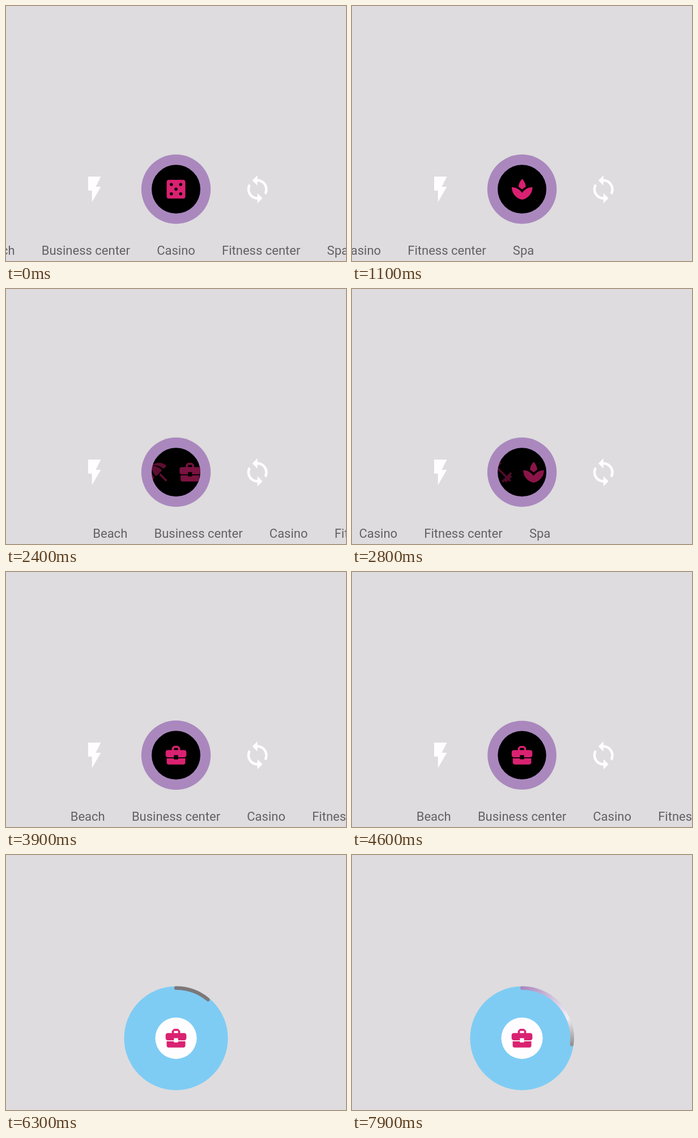
Animation of 600 by 450 pixels, one loop 8000 ms. Source, as an HTML page with a canvas:

```html
<!DOCTYPE html>
<html lang="en">
<head>
<meta charset="utf-8">
<title>Amenity picker button</title>
<style>
  html, body { margin: 0; width: 100%; height: 100%; overflow: hidden; background: #dedcde; }
  canvas { display: block; }
</style>
</head>
<body>
<canvas id="stage" width="600" height="450"></canvas>
<script>
const ctx = document.getElementById('stage').getContext('2d');
const LOOP = 8000, STEP = 100;
const CX = 300, CY = 323.3;
const FONT = '22px Roboto, "Open Sans", sans-serif';
const LABEL_GAP = 47.2, ICON_GAP = 56.5, ICON_LAG = 28;

const PURPLE = [170, 136, 190], BLUE = [126, 204, 244];
const BLACK = [0, 0, 0], WHITE = [255, 253, 255];
const GRAY = [124, 120, 122], PALE_GRAY = [150, 144, 147], LILAC = [243, 238, 243];

const dot = (x, y) => `M${x - 1.5} ${y}a1.5 1.5 0 1 0 3 0a1.5 1.5 0 1 0 -3 0z`;
const dice = 'M19 3H5c-1.1 0-2 .9-2 2v14c0 1.1.9 2 2 2h14c1.1 0 2-.9 2-2V5c0-1.1-.9-2-2-2z' +
  dot(7.5, 7.5) + dot(16.5, 7.5) + dot(12, 12) + dot(7.5, 16.5) + dot(16.5, 16.5);

const pages = [
  ['Beach', 'M13.13 14.56l1.43-1.43 6.44 6.44L19.57 21zM17.42 8.83l2.86-2.86c-3.95-3.95-10.35-3.96-14.3-.02 3.93-1.3 8.31-.25 11.44 2.88zM5.95 5.98c-3.94 3.95-3.93 10.35.02 14.3l2.86-2.86C5.7 14.29 4.65 9.91 5.95 5.98zM5.97 5.96l-.01.01c-.38 3.01 1.17 6.88 4.3 10.02l5.73-5.73c-3.13-3.13-7.01-4.68-10.02-4.3z'],
  ['Business center', 'M10 16v-1H3.01L3 19c0 1.11.89 2 2 2h14c1.11 0 2-.89 2-2v-4h-7v1h-4zm10-9h-4.01V5l-2-2h-4l-2 2v2H4c-1.1 0-2 .9-2 2v3c0 1.11.89 2 2 2h6v-2h4v2h6c1.1 0 2-.9 2-2V9c0-1.1-.9-2-2-2zm-6 0h-4V5h4v2z'],
  ['Casino', dice],
  ['Fitness center', 'M20.57 14.86L22 13.43 20.57 12 17 15.57 8.43 7 12 3.43 10.57 2 9.14 3.43 7.71 2 5.57 4.14 4.14 2.71 2.71 4.14l1.43 1.43L2 7.71l1.43 1.43L2 10.57 3.43 12 7 8.43 15.57 17 12 20.57 13.43 22l1.43-1.43L16.29 22l2.14-2.14 1.43 1.43 1.43-1.43-1.43-1.43L22 16.29z'],
  ['Spa', 'M15.49 9.63c-.18-2.79-1.31-5.51-3.43-7.63-2.14 2.14-3.32 4.86-3.55 7.63 1.28.68 2.46 1.56 3.49 2.63 1.03-1.06 2.21-1.94 3.49-2.63zM12 15.45C9.85 12.17 6.18 10 2 10c0 5.32 3.36 9.82 8.03 11.49.63.23 1.29.4 1.97.51.68-.12 1.33-.29 1.97-.51C18.64 19.82 22 15.32 22 10c-4.18 0-7.85 2.17-10 5.45z']
].map(([name, d]) => ({ name, icon: new Path2D(d) }));

const flash = new Path2D('M7 2v11h3v9l7-12h-4l4-8z');
const sync = new Path2D('M12 4V1L8 5l4 4V6c3.31 0 6 2.69 6 6 0 1.01-.25 1.97-.7 2.8l1.46 1.46C19.54 15.03 20 13.57 20 12c0-4.42-3.58-8-8-8zm0 14c-3.31 0-6-2.69-6-6 0-1.01.25-1.97.7-2.8L5.24 7.74C4.46 8.97 4 10.43 4 12c0 4.42 3.58 8 8 8v3l4-4-4-4v3z');

// Swipes: time and page at each turning point.
const swipes = [[0, 2], [1050, 4], [2197, 0], [2911, 4], [3665, 1]];

const clamp = v => Math.max(0, Math.min(1, v));
const span = (t, a, b) => clamp((t - a) / (b - a));
const mix = (a, b, k) => a + (b - a) * k;
const mixColor = (a, b, k) => `rgb(${a.map((v, i) => Math.round(mix(v, b[i], k))).join(',')})`;

function pageAt(t) {
  let page = swipes[0][1];
  for (let i = 1; i < swipes.length; i++) {
    const [t0, p0] = swipes[i - 1], [t1, p1] = swipes[i];
    if (t >= t0) page = mix(p0, p1, (1 - Math.cos(Math.PI * span(t, t0, t1))) / 2);
  }
  return page;
}

const tap = (t, start) => Math.sin(Math.PI * span(t, start, start + 220)) ** 2;

function disc(r, color) {
  ctx.beginPath();
  ctx.arc(CX, CY, r, 0, 2 * Math.PI);
  ctx.fillStyle = color;
  ctx.fill();
}

function drawIcon(path, x, y, size, color, alpha) {
  ctx.save();
  ctx.globalAlpha = alpha;
  ctx.translate(x, y);
  ctx.scale(size / 24, size / 24);
  ctx.translate(-12, -12);
  ctx.fillStyle = color;
  ctx.fill(path, 'evenodd');
  ctx.restore();
}

function drawLabels(page, alpha) {
  ctx.save();
  ctx.font = FONT;
  ctx.textAlign = 'center';
  ctx.globalAlpha = alpha;
  ctx.fillStyle = '#626164';
  let left = 0;
  const centers = pages.map(({ name }) => {
    const w = ctx.measureText(name).width;
    const center = left + w / 2;
    left += w + LABEL_GAP;
    return center;
  });
  const i = Math.min(Math.floor(page), pages.length - 2);
  const shift = CX - mix(centers[i], centers[i + 1], page - i);
  pages.forEach(({ name }, n) => ctx.fillText(name, centers[n] + shift, 439));
  ctx.restore();
}

function drawButton(t, hold) {
  const press = 1 - 0.08 * (tap(t, 4080) + tap(t, 4580));
  const inner = mix(43, 36.6, hold) * press;
  disc(mix(61.2, 91.6, hold) * press, mixColor(PURPLE, BLUE, hold));
  disc(inner, mixColor(BLACK, WHITE, hold));
  ctx.save();
  ctx.beginPath();
  ctx.arc(CX, CY, inner, 0, 2 * Math.PI);
  ctx.clip();
  const page = pageAt(t - ICON_LAG);
  pages.forEach(({ icon }, n) => {
    const off = n - page;
    if (Math.abs(off) < 1) {
      drawIcon(icon, CX + off * ICON_GAP, CY, 44 * press, '#d92271', 1 - Math.abs(off));
    }
  });
  ctx.restore();
}

function drawProgress(t) {
  const part = (t - 5200) / 10000;
  if (part <= 0) return;
  const tint = span(t, 6300, 7900);
  const tail = mixColor(GRAY, PURPLE, tint);
  const head = mixColor(GRAY, PALE_GRAY, tint);
  const top = -Math.PI / 2;
  const paint = ctx.createConicGradient(top, CX, CY);
  paint.addColorStop(0, tail);
  paint.addColorStop(part * 0.68, mixColor(GRAY, LILAC, tint));
  paint.addColorStop(part, head);
  paint.addColorStop(0.6, head);
  paint.addColorStop(0.9, tail);
  paint.addColorStop(1, tail);
  ctx.beginPath();
  ctx.arc(CX, CY, 88.5, top, top + part * 2 * Math.PI);
  ctx.strokeStyle = paint;
  ctx.lineWidth = 6.4;
  ctx.lineCap = 'round';
  ctx.stroke();
}

function draw(t) {
  ctx.fillStyle = '#dedcde';
  ctx.fillRect(0, 0, 600, 450);
  const hold = span(t, 4950, 5200);
  if (hold < 1) {
    drawIcon(flash, 156.2, 323.5, 54, '#fffdff', 1 - hold);
    drawIcon(sync, 443.7, 323.5, 54, '#fffdff', 1 - hold);
    drawLabels(pageAt(t), 1 - hold);
  }
  drawButton(t, hold);
  drawProgress(t);
}

const start = performance.now();
function tick() {
  const t = (performance.now() - start) % LOOP;
  draw(Math.floor(t / STEP) * STEP);
  requestAnimationFrame(tick);
}
tick();
</script>
</body>
</html>
```
